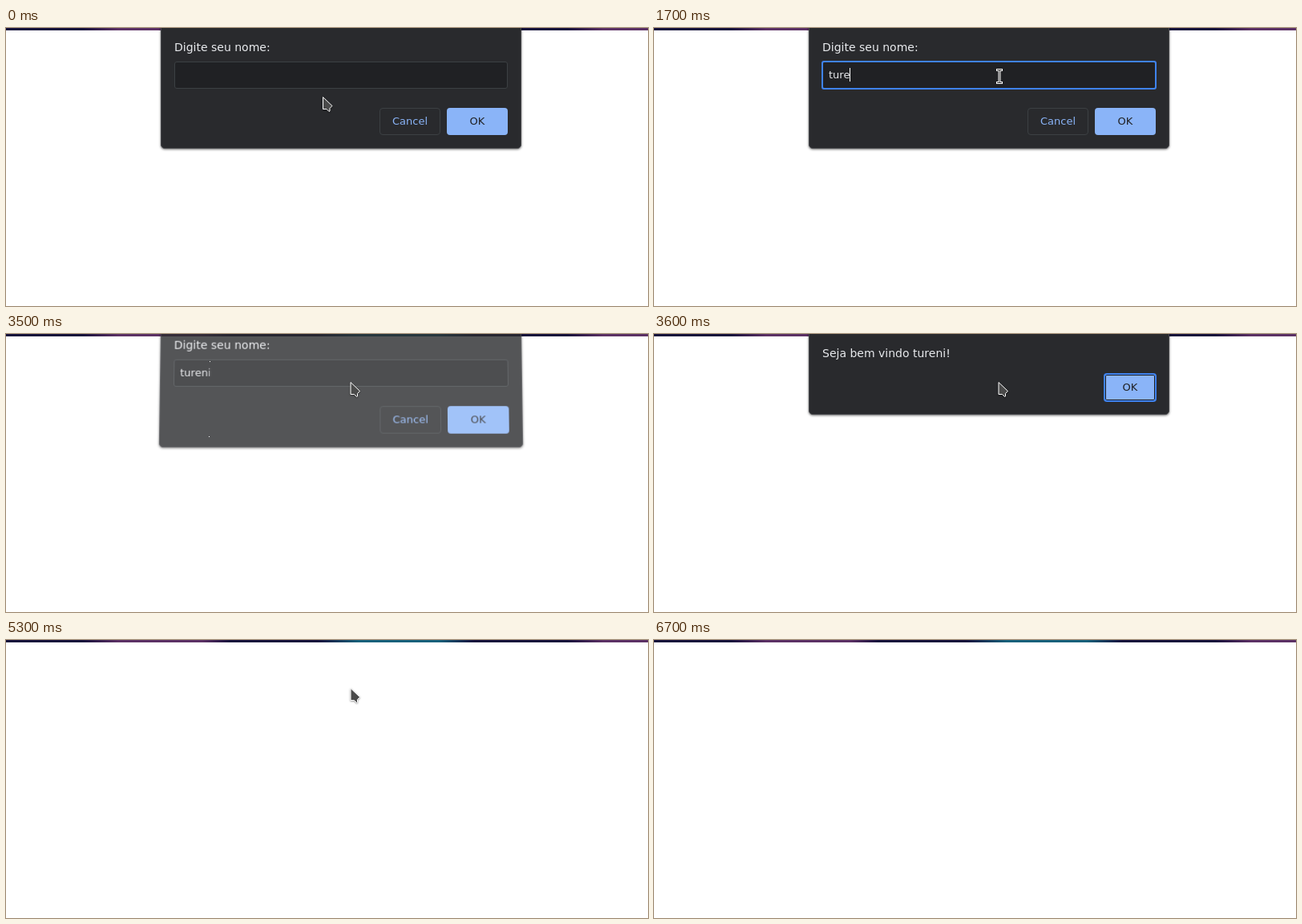
Recreate the animation shown at these times as an HTML page. Size 801 by 348 pixels, loop 7100 ms.

```html
<!DOCTYPE html>
<html lang="pt">
<head>
<meta charset="utf-8">
<style>
  html, body { margin: 0; width: 100%; height: 100%; overflow: hidden; background: #fff; }
  body { position: relative; font: 13px/33px "DejaVu Sans", sans-serif; color: #e8eaed; }
  body * { position: absolute; box-sizing: border-box; white-space: pre; }
  .band {
    left: 0; top: 0; width: 801px; height: 3px;
    background: linear-gradient(90deg, #150f3a 95px, #5b3064 140px 245px, #150f3a 280px 388px,
      #17607a 440px 540px, #150f3a 585px 700px, #5b3064 745px);
  }
  .dialog { left: 0; top: 0; width: 801px; height: 348px; transform-origin: 418px 0; }
  .closing { opacity: .8; transform: translateY(-10.3px) perspective(800px) rotateX(3deg); }
  .panel {
    left: 193px; top: -80px; width: 450px; border-radius: 5px;
    background: #292a2d; border: 1px solid #45464a; box-shadow: 0 1px 3px rgba(0, 0, 0, .6);
  }
  .title { left: 337px; top: -19px; font-size: 14px; line-height: 20px; }
  .message { left: 210px; top: 14px; font-size: 14px; line-height: 20px; }
  .field { left: 210px; top: 42px; width: 416px; height: 34px; border-radius: 3px; background: #202124; border: 1px solid #3c4043; }
  .ring { left: 209px; top: 41px; width: 418px; height: 36px; border-radius: 3px; border: 2px solid #3f83f0; }
  .entry { left: 218px; top: 42px; }
  .entry span { position: static; }
  #caret { display: inline-block; width: 1px; height: 17px; margin-right: -1px; vertical-align: -4px; background: #fff; }
  .button { height: 34px; border-radius: 4px; text-align: center; }
  .ok { background: #8ab4f8; color: #202124; }
  .cancel { left: 466px; top: 100px; width: 76px; color: #8ab4f8; }
  .cancel::before { content: ""; position: absolute; inset: 0; border: 1px solid #3c4043; border-radius: 4px; }
  .halo { left: 561px; top: 49px; width: 66px; height: 36px; border-radius: 4px; border: 2px solid #3f83f0; box-shadow: inset 0 0 0 1px #202124; }
  svg { left: 0; top: 0; width: 801px; height: 348px; }
</style>
</head>
<body>
<div class="band"></div>

<div class="dialog" id="prompt">
  <div class="panel" style="height:231px"></div>
  <div class="title">says</div>
  <div class="message">Digite seu nome:</div>
  <div class="field"></div>
  <div class="ring" id="ring"></div>
  <div class="entry"><span id="typed"></span><span id="caret"></span></div>
  <div class="button cancel">Cancel</div>
  <div class="button ok" style="left:550px;top:100px;width:76px">OK</div>
</div>

<div class="dialog" id="alert">
  <div class="panel" style="height:181px"></div>
  <div class="title">says</div>
  <div class="message" id="greeting"></div>
  <div class="button ok" style="left:562px;top:50px;width:64px">OK</div>
  <div class="halo" id="halo"></div>
</div>

<svg viewBox="0 0 801 348">
  <g id="pointer">
    <path id="arrow" d="M0 .5V15.5H4.5L7.5 18.5L8.5 18V14.5L11.5 11.5Z" fill="#4a4a4a" stroke="#fff"
      style="filter:drop-shadow(0 1px 1px rgba(0,0,0,.4))"/>
    <g id="beam" fill="none">
      <path d="M-3 -7.5H5M-3 8.5H5M1 -7.5V8.5" stroke="#fff" stroke-width="3"/>
      <path d="M-2 -7.5H4M-2 8.5H4M1 -7.5V8.5" stroke="#333"/>
    </g>
  </g>
</svg>

<script>
const LOOP = 7100, STEP = 100;
const NAME = "tureni";
const KEY_TIMES = [1000, 1200, 1500, 1700, 2100, 2300];
// Pointer stops: time, x, y
const PATH = [
  [100, 395.5, 86], [600, 430, 60], [5500, 430, 60], [5700, 502, 149],
  [5900, 502, 149], [6600, 48, -8], [6700, 48, -40]
];

const el = id => document.getElementById(id);
const show = (id, on) => { el(id).style.visibility = on ? "inherit" : "hidden"; };
const between = (t, from, to) => t >= from && t < to;

function pointerAt(t) {
  const next = PATH.findIndex(p => p[0] > t);
  if (next === 0) return PATH[0].slice(1);
  if (next < 0) return PATH.at(-1).slice(1);
  const [t0, x0, y0] = PATH[next - 1], [t1, x1, y1] = PATH[next];
  const u = (t - t0) / (t1 - t0), k = u * u * (3 - 2 * u);
  return [x0 + (x1 - x0) * k, y0 + (y1 - y0) * k];
}

function render(t) {
  const focused = between(t, 700, 3500);
  show("prompt", t < 3600);
  el("prompt").classList.toggle("closing", between(t, 3500, 3600));
  show("ring", focused);
  el("ring").style.opacity = t < 800 ? .6 : 1;
  show("caret", focused && !between(t, 2800, 3300));
  el("typed").textContent = NAME.slice(0, KEY_TIMES.filter(k => k <= t).length);

  show("alert", between(t, 3600, 5300));
  el("alert").classList.toggle("closing", t >= 5200);
  show("halo", t < 5200 && t >= 3600);

  const [x, y] = pointerAt(t);
  const overField = t < 3400 && y < 76;
  el("pointer").setAttribute("transform", `translate(${x} ${y})`);
  show("arrow", !overField);
  show("beam", overField);
}

el("greeting").textContent = `Seja bem vindo ${NAME}!`;
const start = performance.now();
function frame() {
  const t = (performance.now() - start) % LOOP;
  render(Math.floor(t / STEP) * STEP);
  requestAnimationFrame(frame);
}
frame();
</script>
</body>
</html>
```
